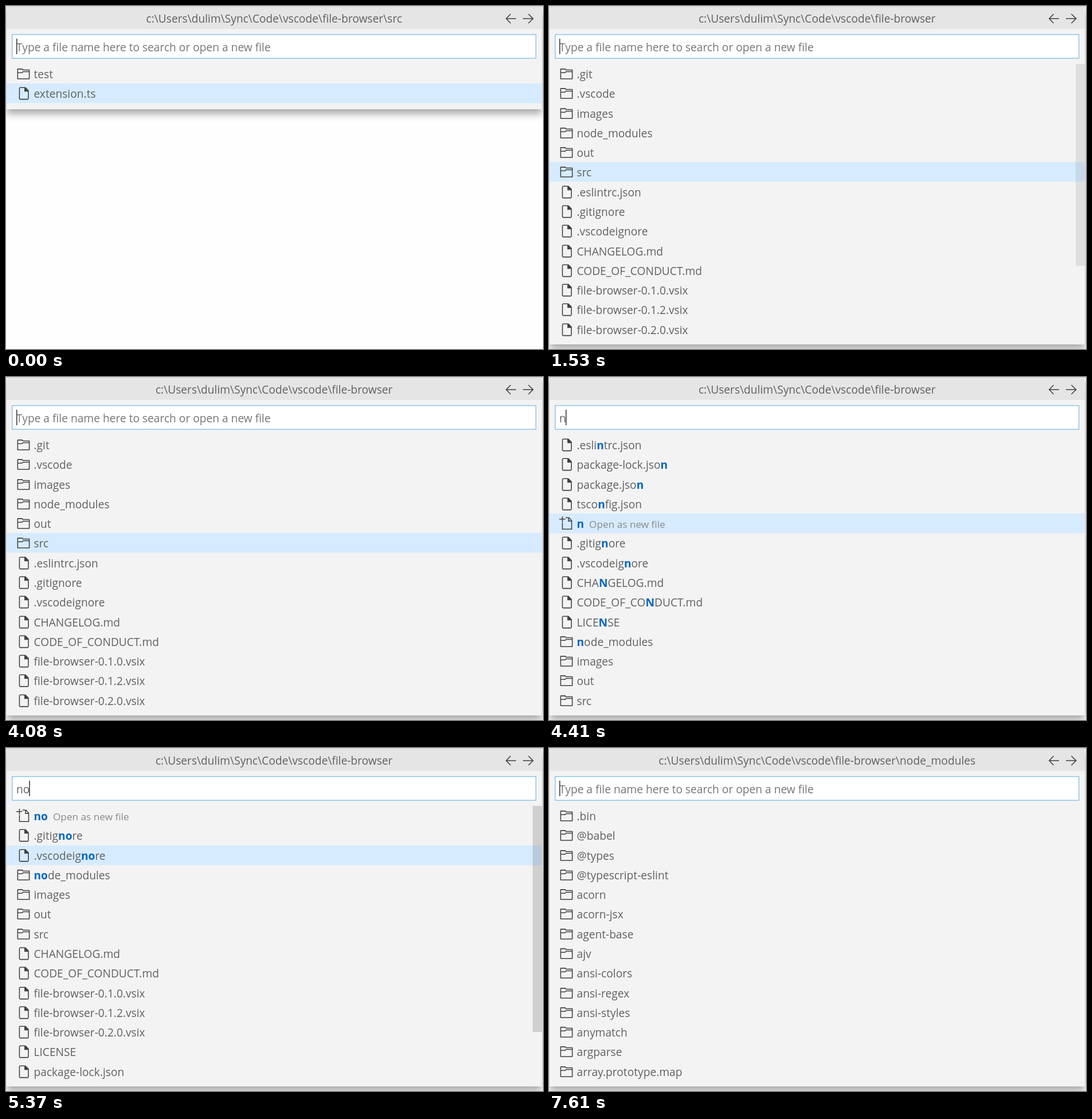
Write an HTML page that moves like this. It is 937 by 598 pixels and loops after 8 s.

```html
<!DOCTYPE html>
<html lang="en">
<head>
<meta charset="utf-8">
<title>File browser</title>
<style>
  html, body { margin: 0; width: 100%; height: 100%; overflow: hidden; background: #fefefe; }
  #panel { position: absolute; left: 1px; top: 0; width: 934px; background: #f3f3f3; box-shadow: 0 7.8px 12.5px #a8a8a8; }
  svg { position: absolute; left: 0; top: 0; }
  text { font: 19.18px "Open Sans", "Noto Sans", sans-serif; fill: #616161; white-space: pre; }
  .hit { font-weight: 700; fill: #0066bf; }
  .note { font-size: 17.2px; fill: #8a8a8a; }
  .hint { fill: #767676; }
  .icon { fill: #424242; fill-rule: evenodd; }
  .line { fill: none; stroke: #424242; }
</style>
</head>
<body>
<div id="panel"></div>
<svg width="937" height="598" viewBox="0 0 937 598">
  <rect x="1" width="934" height="40" fill="#e5e5e5"/>
  <rect width="937" height="2" fill="#d9d9d9"/>
  <text id="path" x="467.8" y="29" text-anchor="middle"></text>
  <path class="line" stroke-width="1.6" d="M890 22H873M880.5 14L872.8 22L880.5 30M902 22H919M911.5 14L919.7 22L911.5 30"/>
  <rect x="10.75" y="49.75" width="913.8" height="41.5" fill="#fff" stroke="#8fc5ea" stroke-width="1.5"/>
  <text id="input" x="18" y="79"></text>
  <rect id="caret" y="57" width="1.5" height="27" fill="#333"/>
  <rect id="selection" x="1" width="934" height="34.3" fill="#d6ebff"/>
  <g id="rows"></g>
  <rect id="thumb" x="919" y="101" width="16" fill="#646464"/>
</svg>
<script>
const LOOP = 8000;
const ROOT = 'c:\\Users\\dulim\\Sync\\Code\\vscode\\file-browser';
const HINT = 'Type a file name here to search or open a new file';
const $ = id => document.getElementById(id);

const ICONS = {
  '/': '<path class="icon" d="M14.5 3H7.71l-.85-.85L6.51 2h-5l-.5.5v11l.5.5h13l.5-.5v-10zM14 13H2V7h4.49l.35-.15.86-.86H14zM14 5H7.49l-.35.15-.86.86H2V3h4.29l.85.85.36.15H14z"/>',
  '+': '<path class="line" d="M7 1.5h3.7l3.1 3.2v9.6H3.5V7M10.3 1.5v3.7h3.5M0 3.1h6.7M3.5 0v6.5"/>',
  '': '<path class="icon" d="M13.71 4.29l-3-3L10 1H4L3 2v12l1 1h9l1-1V5zM13 14H4V2h5v4h4z"/>'
};

// A leading "/" marks a folder, "+" the new-file entry.
const LISTS = {
  src: '/test extension.ts',
  root: '/.git /.vscode /images /node_modules /out /src .eslintrc.json .gitignore .vscodeignore CHANGELOG.md CODE_OF_CONDUCT.md file-browser-0.1.0.vsix file-browser-0.1.2.vsix file-browser-0.2.0.vsix',
  n: '.eslintrc.json package-lock.json package.json tsconfig.json +n .gitignore .vscodeignore CHANGELOG.md CODE_OF_CONDUCT.md LICENSE /node_modules /images /out /src',
  no: '+no .gitignore .vscodeignore /node_modules /images /out /src CHANGELOG.md CODE_OF_CONDUCT.md file-browser-0.1.0.vsix file-browser-0.1.2.vsix file-browser-0.2.0.vsix LICENSE package-lock.json',
  modules: '/.bin /@babel /@types /@typescript-eslint /acorn /acorn-jsx /agent-base /ajv /ansi-colors /ansi-regex /ansi-styles /anymatch /argparse /array.prototype.map'
};

const VIEWS = {
  src: { path: ROOT + '\\src', query: '', caret: 18, thumb: 0, bottom: 180 },
  root: { path: ROOT, query: '', caret: 18, thumb: 352, bottom: 590 },
  n: { path: ROOT, query: 'n', caret: 29, thumb: 0, bottom: 590 },
  no: { path: ROOT, query: 'no', caret: 40.3, thumb: 394, bottom: 590 },
  modules: { path: ROOT + '\\node_modules', query: '', caret: 18, thumb: 37, bottom: 590 }
};

// Each track lists [start time, value]; values hold until the next step.
const VIEW = [[0, 'src'], [1460, 'root'], [4410, 'n'], [4480, 'no'], [5780, 'modules']];
const SELECTED = [[0, 1], [1460, 5], [4410, 4], [4480, 0], [5090, 1], [5230, 2], [5440, 3], [5780, -1]];
const THUMB = [[0, 0], [1530, .14], [1600, .25], [2140, .12], [2350, .01], [2560, 0], [5090, .25],
  [5780, 0], [5850, .14], [5920, .25], [6460, .12], [6670, .05], [6950, 0]];
const BLINKS = [0, 70, 470, 930, 1390, 1860, 2350, 2760, 3220, 3680, 4080, 4880, 5370, 6180, 6670, 7150, 7610];
const CARET = BLINKS.map((time, i) => [time, i % 2 ? 0 : 1]);

const valueAt = (track, time) => track.findLast(step => step[0] <= time)[1];
const rowTop = i => Math.round(101 + i * 34.28);

function label(name, query) {
  const at = query ? name.toLowerCase().indexOf(query) : -1;
  if (at < 0) return name;
  const end = at + query.length;
  return `${name.slice(0, at)}<tspan class="hit">${name.slice(at, end)}</tspan>${name.slice(end)}`;
}

function row(entry, i, query) {
  const kind = '/+'.includes(entry[0]) ? entry[0] : '';
  const name = entry.slice(kind.length);
  const y = rowTop(i);
  const note = kind === '+' ? '<tspan class="note" dx="9">Open as new file</tspan>' : '';
  return `<g transform="translate(18 ${y + 5}) scale(1.56)">${ICONS[kind]}</g>` +
    `<text x="48.5" y="${y + 25}">${label(name, query)}${note}</text>`;
}

let shown;
function showView(key) {
  if (key === shown) return;
  shown = key;
  const view = VIEWS[key];
  $('path').textContent = view.path;
  $('input').textContent = view.query || HINT;
  $('input').setAttribute('class', view.query ? '' : 'hint');
  $('caret').setAttribute('x', view.caret);
  $('thumb').setAttribute('height', view.thumb);
  $('panel').style.height = view.bottom + 'px';
  $('rows').innerHTML = LISTS[key].split(' ').map((entry, i) => row(entry, i, view.query)).join('');
}

function draw() {
  const time = performance.now() % LOOP;
  showView(valueAt(VIEW, time));
  const selected = valueAt(SELECTED, time);
  $('selection').setAttribute('y', rowTop(selected));
  $('selection').setAttribute('opacity', selected < 0 ? 0 : 1);
  $('caret').setAttribute('opacity', valueAt(CARET, time));
  $('thumb').setAttribute('opacity', valueAt(THUMB, time));
  requestAnimationFrame(draw);
}
draw();
</script>
</body>
</html>
```
